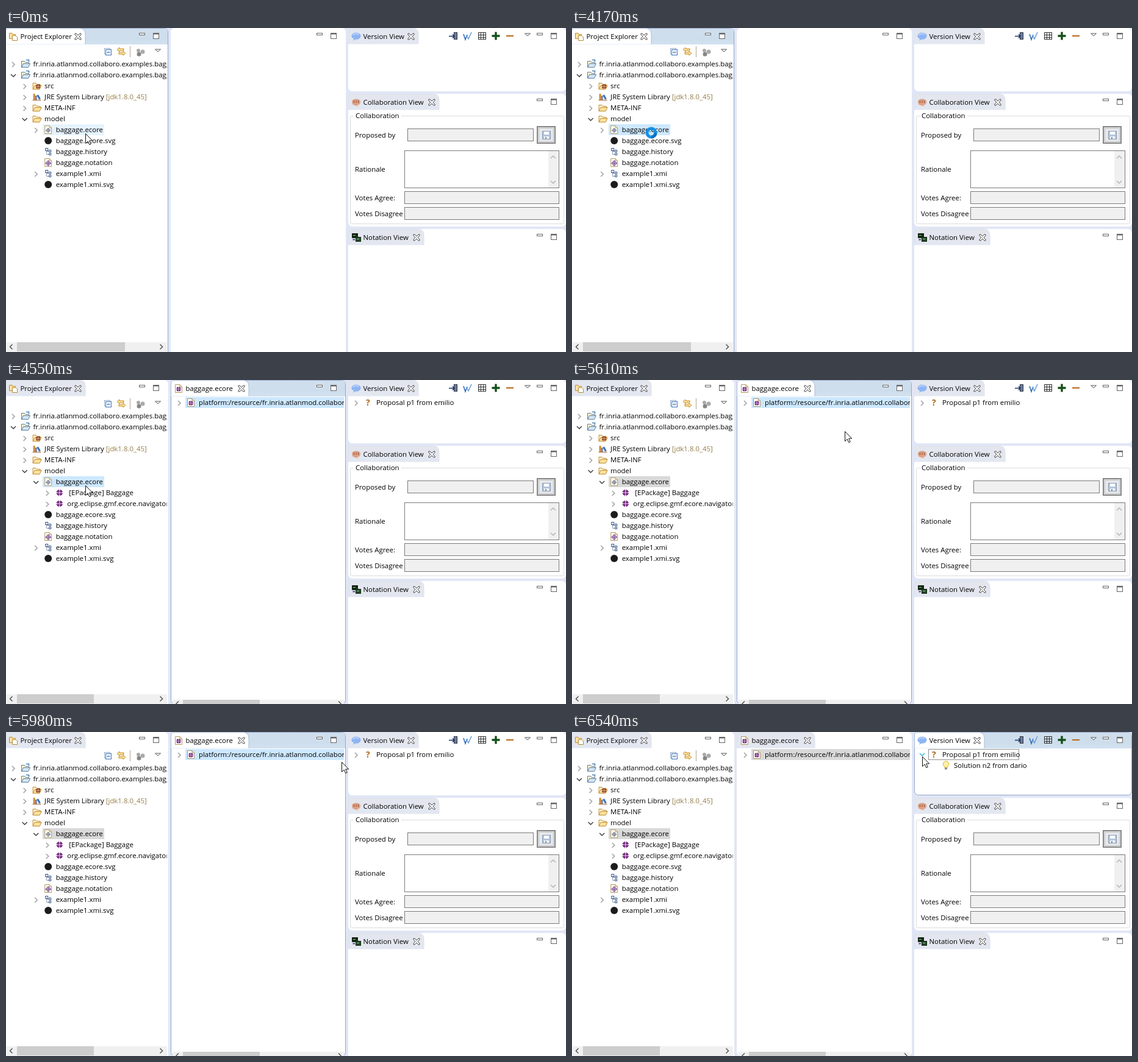
An HTML page for the animation above (8000 ms loop, 918 by 532 pixels).

```html
<!DOCTYPE html>
<html lang="en">
<head>
<meta charset="utf-8">
<title>Model editor</title>
<style>
html, body { margin: 0; width: 100%; height: 100%; overflow: hidden; background: #e1e6f6; }
svg { display: block; }
text { font: 11.4px "Open Sans", "Noto Sans", sans-serif; fill: #000; white-space: pre; }
</style>
</head>
<body>
<svg width="918" height="532" viewBox="0 0 918 532">
  <defs>
    <linearGradient id="bar" x2="0" y2="1"><stop stop-color="#d0dfee"/><stop offset=".6" stop-color="#cdddec"/><stop offset="1" stop-color="#d2e1f0"/></linearGradient>
    <linearGradient id="tabOff" x2="0" y2="1"><stop stop-color="#e3e6ed"/><stop offset="1" stop-color="#e3e7f1"/></linearGradient>
    <clipPath id="leftClip"><path d="M0 0H263.5V532H0z"/></clipPath>
    <clipPath id="midClip"><path d="M271 0H554V532H271z"/></clipPath>
  </defs>
  <g id="scene"></g>
  <path id="arrow" d="M.5 .5V16.5L4.2 13 6.8 18.7 9.2 17.6 6.7 12H11.7z" fill="#fff" stroke="#111"/>
  <g id="busy" fill="none" stroke-width="5">
    <circle r="7" stroke="#1591e6"/>
    <path id="sweep" d="M0-7A7 7 0 0 1 7 0" stroke="#0b73c4"/>
  </g>
</svg>
<script>
const $ = id => document.getElementById(id);
const LOOP = 8000;
const HOVERED = 0, OPENING = 2, OPENED = 3, MOVING = 4, AT_NODE = 5, EXPANDING = 6, EXPANDED = 7;
const STARTS = [0, 750, 4170, 4550, 4920, 6220, 6480, 6540];

const rect = (x, y, w, h, fill, stroke = 'none', more = '') =>
  `<rect x="${x}" y="${y}" width="${w}" height="${h}" fill="${fill}" stroke="${stroke}" ${more}/>`;
const line = (d, stroke, width = 1, fill = 'none') =>
  `<path d="${d}" fill="${fill}" stroke="${stroke}" stroke-width="${width}"/>`;
const fill = (d, color) => `<path d="${d}" fill="${color}"/>`;
const text = (x, y, s, more = '') => `<text x="${x}" y="${y}" ${more}>${s}</text>`;
const at = (x, y, s, scale = 1) => `<g transform="translate(${x} ${y}) scale(${scale})">${s}</g>`;
const clip = (id, s) => `<g clip-path="url(#${id})">${s}</g>`;

// Icons are drawn around their centre.
const folder = (body = '#fbe3a2', edge = '#c38a2e') =>
  line('M-6.5 5.5V-4.5H-1.5L0-2.5H5.5V0', edge, 1, '#fff3cf') + line('M-6.5 5.5L-3.5-.5H7.5L4.5 5.5z', edge, 1, body);
const sheet = line('M-5.5-6.5H2L5.5-3V6.5H-5.5z', '#b39a62', 1, '#fffdf3') + line('M2-6.5V-3H5.5', '#b39a62');
const packageMark = (color, cut) => rect(-4, -4, 8, 8, color) +
  line('M-1.5-5.5V5.5M1.5-5.5V5.5M-5.5-1.5H5.5M-5.5 1.5H5.5', color) + line('M0-4V4M-4 0H4', cut);
const purple = packageMark('#74267f', '#ead5ee');
const icons = {
  project: folder('#d3e6f5', '#5b7f9f') + line('M1-6.5H5.5V-3.5', '#4a7fb5', 1.5),
  src: folder() + at(2, 1, packageMark('#8b3f2c', '#f1cf9b'), .75),
  library: rect(-6, -5, 3, 10, '#d98a2b') + rect(-3, -2, 3, 7, '#6a7fa8') + line('M1-3L5 4', '#3f70b5', 3) + line('M-7 5.5H7', '#a8642a'),
  folder: folder(),
  ecore: sheet + line('M-4 1H4M0-3V5', '#5d6885') + '<circle cy="1" r="2.7" fill="none" stroke="#6a7591"/>',
  editor: sheet + at(0, 1, purple, .75),
  svg: '<circle r="6" fill="#1c1c1c"/>',
  tree: line('M-2.5-3V4.5H2M-2.5-.5H2', '#8b93a8') + rect(-4.5, -5.5, 4, 4, '#fff', '#32558c') +
    rect(1.5, -2.5, 3, 3, '#fff', '#32558c') + rect(1.5, 2.5, 3, 3, '#fff', '#32558c'),
  notation: sheet + line('M0-3.5L4.5 1 0 5.5-4.5 1z', '#6c3d87', 1, '#d9c6e6') + line('M0-3V5M-4 1H4', '#6c3d87'),
  package: purple,
  explorer: line('M-6.5-5.5H-2L-1-3.5H3.5V3.5H-6.5z', '#c38a2e', 1, '#fbe3a2') + line('M-1.5-1.5H4L6.5 1V6.5H-1.5z', '#b78a39', 1, '#fff'),
  bubble: fill('M-7.5-1C-7.5-8 7.5-8 7.5-1C7.5 5 0 5-1 4.5L-4.5 7 -4 3.5C-6.5 3-7.5 1-7.5-1z', '#8eb5f2') +
    line('M-5-2C-4-5 3-5 4-3', '#c6dcff', 1.5),
  talk: fill('M-7-1C-7-7 7-7 7-1C7 4 3 5 1 4.5L3 7 -2 5C-5 5-7 2-7-1z', '#dea183') + line('M-3.5-3V1M0-3V1M3.5-3V1', '#8d4f3a'),
  screens: rect(-6.5, -6.5, 9, 7, '#102a10', '#222') + rect(-.5, -.5, 8, 7, '#174e1c', '#222') +
    line('M-5-3.5H-1M1 2.5H5', '#8bd08b') + line('M-5.5 3.5H-2', '#447', 2),
  bulb: line('M-2.5 3C-2.5 1-4.5 0-4.5-2.5A4.5 4.5 0 0 1 4.5-2.5C4.5 0 2.5 1 2.5 3z', '#d8ab2c', 1, '#fff2a6') + rect(-2, 3.5, 4, 3, '#8b8b8b')
};
const icon = (name, x, y) => at(x, y, icons[name]);

const chevron = (x, y, open, color = open ? '#404040' : '#a0a0a0') =>
  line(open ? `M${x - 4} ${y - 2}l4 4 4-4` : `M${x - 2} ${y - 4}l4 4-4 4`, color, 1.5);
const triangle = (x, y) => line(`M${x - 4.5} ${y - 2}h9l-4.5 4z`, '#555', 1, '#fff');
const cross = (x, y) => line(`M${x - 5} ${y - 4.5}h2l3 3 3-3h2v2l-3 3 3 3v2h-2l-3-3-3 3h-2v-2l3-3-3-3z`, '#444', 1, '#fff');

function panel(x, y, w, h, { name, image, tab, active }) {
  let s = rect(x + .5, y + .5, w - 1, h - 1, '#fff', active ? '#91a8cf' : '#fff', 'rx="6"');
  if (active) s += fill(`M${x + 1} ${y + 27}V${y + 6}q0-5 5-5H${x + w - 6}q5 0 5 5V${y + 27}z`, 'url(#bar)');
  if (name) {
    s += line(`M${x + .5} ${y + 26.5}V${y + 6}q0-5.5 5-5.5H${tab - 10}q9 0 9 10V${y + 26.5}`,
      active ? '#a9bdd8' : '#dde1ea', 1, active ? '#fff' : 'url(#tabOff)');
    s += icon(image, x + 13, y + 14) + text(x + 24.5, y + 18, name) + cross(tab - 13, y + 13.5);
  }
  const right = x + w - 20;
  return s + rect(right - 27.5, y + 8.5, 9, 3, '#fff', '#666') +
    rect(right - 4.5, y + 8.5, 9, 9, '#fff', '#666') + line(`M${right - 5} ${y + 9.5}h10`, '#666', 2);
}

function row(y, depth, image, label, branch, shift = 0) {
  const x = 12 + depth * 18.6;
  return (branch === undefined ? '' : chevron(x, y + 1, branch)) +
    icon(image, x + 20, y) + text(x + 32.5 + shift, y + 4, label);
}

function explorer(phase) {
  const opened = phase >= OPENED;
  const selection = phase === HOVERED ? '#e5f3ff' : phase >= MOVING ? '#d9d9d9' : '#cde8ff';
  const bundle = 'fr.inria.atlanmod.collaboro.examples.baggage';
  const rows = [
    [0, 'project', bundle, false],
    [0, 'project', bundle, true],
    [1, 'src', 'src', false],
    [1, 'library', 'JRE System Library <tspan fill="#957d47">[jdk1.8.0_45]</tspan>', false],
    [1, 'folder', 'META-INF', false],
    [1, 'folder', 'model', true],
    [2, 'ecore', 'baggage.ecore', opened],
    ...(opened ? [[3, 'package', '[EPackage] Baggage', false, 3], [3, 'package', 'org.eclipse.gmf.ecore.navigator', false]] : []),
    [2, 'svg', 'baggage.ecore.svg'],
    [2, 'tree', 'baggage.history'],
    [2, 'notation', 'baggage.notation'],
    [2, 'tree', 'example1.xmi', false],
    [2, 'svg', 'example1.xmi.svg']
  ];
  return panel(-1, 0, 267, 540, { name: 'Project Explorer', image: 'explorer', tab: 131, active: !opened }) +
    rect(161.5, 33.5, 9, 9, '#fff', '#8aa9cf') + rect(163.5, 35.5, 9, 9, '#eaf3ff', '#4c78b0') + line('M165.5 40h5', '#234f91') +
    line('M186 32l-4 3.5 4 3.5v-2h7v-3h-7zM192 38l4 3.5-4 3.5v-2h-7v-3h7z', '#c58a22', 1, '#ffe7a0') +
    line('M203.5 30V48', '#b5a58a') +
    '<g fill="#aaa"><circle cx="217" cy="37" r="3"/><circle cx="224" cy="39" r="3.5"/><circle cx="218" cy="43" r="3.5" fill="#888"/></g>' +
    triangle(249, 37) +
    clip('leftClip', rect(60, 158, 101, 18, selection) +
      rows.map(([depth, ...rest], i) => row(59 + 18 * i, depth, ...rest)).join('')) +
    rect(1, 516, 263, 16, '#f0f0f0') + rect(18, 516, opened ? 126 : 177, 15, '#cdcdcd') +
    line('M10.5 519.5l-4 4 4 4M252.5 519.5l4 4-4 4', '#555', 1.5);
}

function editor(phase) {
  if (phase < OPENED) return panel(270, 0, 287, 540, {});
  const active = phase < EXPANDED;
  return panel(270, 0, 287, 532, { name: 'baggage.ecore', image: 'editor', tab: 399, active }) +
    clip('midClip', rect(294, 28, 262, 18, active ? '#cde8ff' : '#d9d9d9') + chevron(284, 38, false) +
      icon('editor', 303, 37) + text(316, 41, 'platform:/resource/fr.inria.atlanmod.collaboro.examples')) +
    rect(273, 525, 281, 7, '#f0f0f0') + rect(290, 525, 126, 7, '#cdcdcd') +
    line('M283 527.5l-4 4 4 4M545 527.5l4 4-4 4', '#555', 1.5);
}

function versions(phase) {
  const opened = phase >= OPENED, expanded = phase === EXPANDED;
  let s = panel(561, 0, 357, 104, { name: 'Version View', image: 'bubble', tab: 677, active: expanded }) +
    rect(734.5, 7.5, 5, 11, '#6f7c94', '#273142') + line('M726 13.5h9m-3-3l3 3-3 3', '#1a3569', 1.6) +
    line('M750 10l3 9 3-8', '#2f6fbd', 1.6) + line('M755 12l3 6 5-11', '#6d9fd8', 1.6) +
    line('M774.5 7v12m4-12v12m4-12v12m4-12v12M774 7.5h13m-13 4h13m-13 4h13m-13 3h13', '#333') +
    line('M803 6.5v13M796.5 13h13', '#174f17', 3.4) + line('M820 13h12', '#b86617', 2) + triangle(855, 11);
  if (!opened) return s;
  s += chevron(574, expanded ? 37 : 38, expanded, phase >= AT_NODE ? '#2fb4ea' : undefined) +
    text(590, 42, '?', 'style="font-weight:700;font-size:14px;fill:#b0681f"') + text(607, 41, 'Proposal p1 from emilio');
  if (expanded) s += rect(584.5, 28.5, 148, 17, 'none', '#222', 'stroke-dasharray="1 1"') +
    icon('bulb', 613, 55) + text(626, 59, 'Solution n2 from dario');
  return s;
}

const field = (x, y, w, h, color = '#f0f0f0') => rect(x + .5, y + .5, w - 1, h - 1, color, '#7a7a7a');
const sides = panel(561, 108, 357, 218, { name: 'Collaboration View', image: 'talk', tab: 711 }) +
  rect(564.5, 144.5, 350, 177, 'none', '#dcdcdc', 'rx="1"') + rect(570, 138, 78, 12, '#fff') +
  text(573, 148, 'Collaboration') + text(572, 180, 'Proposed by') + text(572, 236, 'Rationale') +
  text(572, 283, 'Votes Agree:') + text(572, 309, 'Votes Disagree') +
  field(658, 165, 207, 21) + field(653, 201, 254, 62, '#fff') + field(653, 268, 254, 21) + field(653, 294, 254, 21) +
  rect(889, 202, 17, 60, '#f0f0f0') + line('M893 214l4-4 4 4M893 251l4 4 4-4', '#b5b5b5', 1.5) +
  rect(871, 162, 29, 27, '#e7e7e7', '#858585', 'stroke-width="2"') + rect(873.5, 164.5, 24, 22, '#e6e8eb', '#c0c0c0') +
  rect(879.5, 169.5, 13, 13, '#b5c5da', '#879db9') + rect(882, 170, 8, 5, '#fff') + rect(882, 178, 8, 4, '#f3f6fb') + rect(884, 179, 2, 3, '#7b91ad') +
  panel(561, 330, 357, 210, { name: 'Notation View', image: 'screens', tab: 686 });

// The pointer is sampled at a fixed rate while it crosses the stage.
const STEP = 1300 / 17;
function pointer(t) {
  if (t < 4920) return [130, 173];
  const k = Math.min(17, Math.floor((t - 4920) / STEP + .01));
  const mix = (a, b, u) => a.map((v, i) => v + (b[i] - v) * u);
  if (k <= 9) return mix([130, 173], [447, 84], ((k + 1) / 10) ** 1.1);
  return mix([481, 73], [574, 40], 1 - (1 - (k - 10) / 7) ** 2.4);
}

let shown = -1;
function draw(now) {
  const t = now % LOOP;
  const phase = STARTS.findLastIndex(start => t >= start);
  if (phase !== shown) {
    $('scene').innerHTML = explorer(phase) + editor(phase) + versions(phase) + sides;
    shown = phase;
  }
  const waiting = phase === OPENING || phase === EXPANDING;
  const [x, y] = pointer(t).map(Math.round);
  $('arrow').style.display = waiting ? 'none' : '';
  $('busy').style.display = waiting ? '' : 'none';
  $('arrow').setAttribute('transform', `translate(${x} ${y})`);
  $('busy').setAttribute('transform', `translate(${x} ${Math.min(y, 172)})`);
  $('sweep').setAttribute('transform', `rotate(${phase === OPENING ? 90 : 200})`);
}

const begin = performance.now();
(function loop() {
  draw(performance.now() - begin);
  requestAnimationFrame(loop);
})();
</script>
</body>
</html>
```
